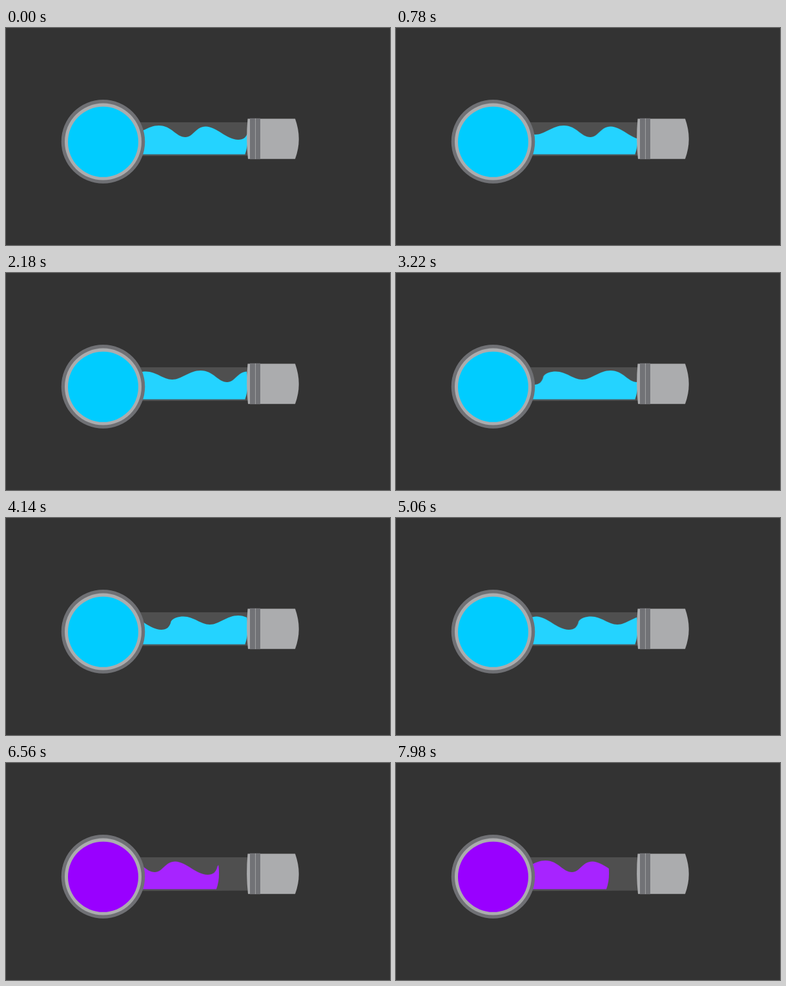
Write an HTML page that moves like this. It is 595 by 336 pixels and loops after 8 s.

```html
<!DOCTYPE html>
<html lang="en">
<head>
<meta charset="utf-8">
<title>Liquid tube</title>
<style>
  html, body { margin: 0; width: 100%; height: 100%; overflow: hidden; background: #333; }
  svg { display: block; width: 595px; height: 336px; }
  .full { fill: #0cf; stroke: #0cf; }
  .low { fill: #90f; stroke: #90f; animation: reveal 8s step-end infinite; }
  .wave { stroke: none; animation: drift 8s linear infinite; }
  .rim { stroke-width: 1; stroke-opacity: .5; }
  .low .rim { stroke-opacity: .2; }
  .full { animation: conceal 8s step-end infinite; }
  @keyframes drift { to { transform: translateX(237.6px); } }
  @keyframes reveal { 0% { opacity: 0; } 77%, 100% { opacity: 1; } }
  @keyframes conceal { 0% { opacity: 1; } 77%, 100% { opacity: 0; } }
</style>
</head>
<body>
<svg viewBox="0 0 595 336">
  <defs>
    <clipPath id="fullTube">
      <path d="M150 146H371.5C375.5 163 376 180 370.5 195.2H150Z"/>
    </clipPath>
    <clipPath id="lowTube">
      <path d="M150 146H327C331 163 331.500 180 326 195.2H150Z"/>
    </clipPath>
  </defs>

  <g class="full">
    <g clip-path="url(#fullTube)"><path class="wave"/></g>
    <path class="rim" d="M150 195.7H370.5"/>
  </g>
  <g class="low">
    <g clip-path="url(#lowTube)"><path class="wave"/></g>
    <path class="rim" d="M150 195.7H326"/>
  </g>

  <!-- glass -->
  <path d="M150 146H376V197.600L150 198.600Z" fill="#fff" fill-opacity=".14"/>

  <!-- cap -->
  <path d="M374.500 140.500H448Q459.500 172 448 202.800H375Q371.500 172 374.500 140.500Z" fill="#abacae"/>
  <path d="M378 139.700H394V203.300H378Z" fill="#717276"/>
  <path d="M386.500 140V203" stroke="#abacae" stroke-width=".8"/>

  <!-- bulb -->
  <circle cx="150.500" cy="175.900" r="64.800" fill="#6f7074"/>
  <circle cx="150.500" cy="176.100" r="59.500" fill="#abacae"/>
  <g stroke="none">
    <circle class="full" cx="150.500" cy="176.300" r="54.500" stroke="none" style="stroke:none"/>
    <circle class="low" cx="150.500" cy="176.300" r="54.500" style="stroke:none"/>
  </g>
</svg>
<script>
  // One wave period, 242.2 px wide, starting at the steep crest.
  const period = [
    'c4-5.5 11-7.5 19.3-7.5',
    'c16 0 26.7 12.5 40.7 12.5',
    'c14.5 0 26.5-14 44-14',
    'c20.3 0 26.3 18 41.3 18',
    'c12 0 16-16.5 31.4-16.5',
    'c16.6 0 32.6 20.5 50.3 20.5',
    'c8.3 0 13.3-4 15.2-13'
  ].join('');
  const outline = `M-109.5 160${period.repeat(2)}V200H-109.5Z`;
  document.querySelectorAll('.wave').forEach(wave => wave.setAttribute('d', outline));
</script>
</body>
</html>
```
